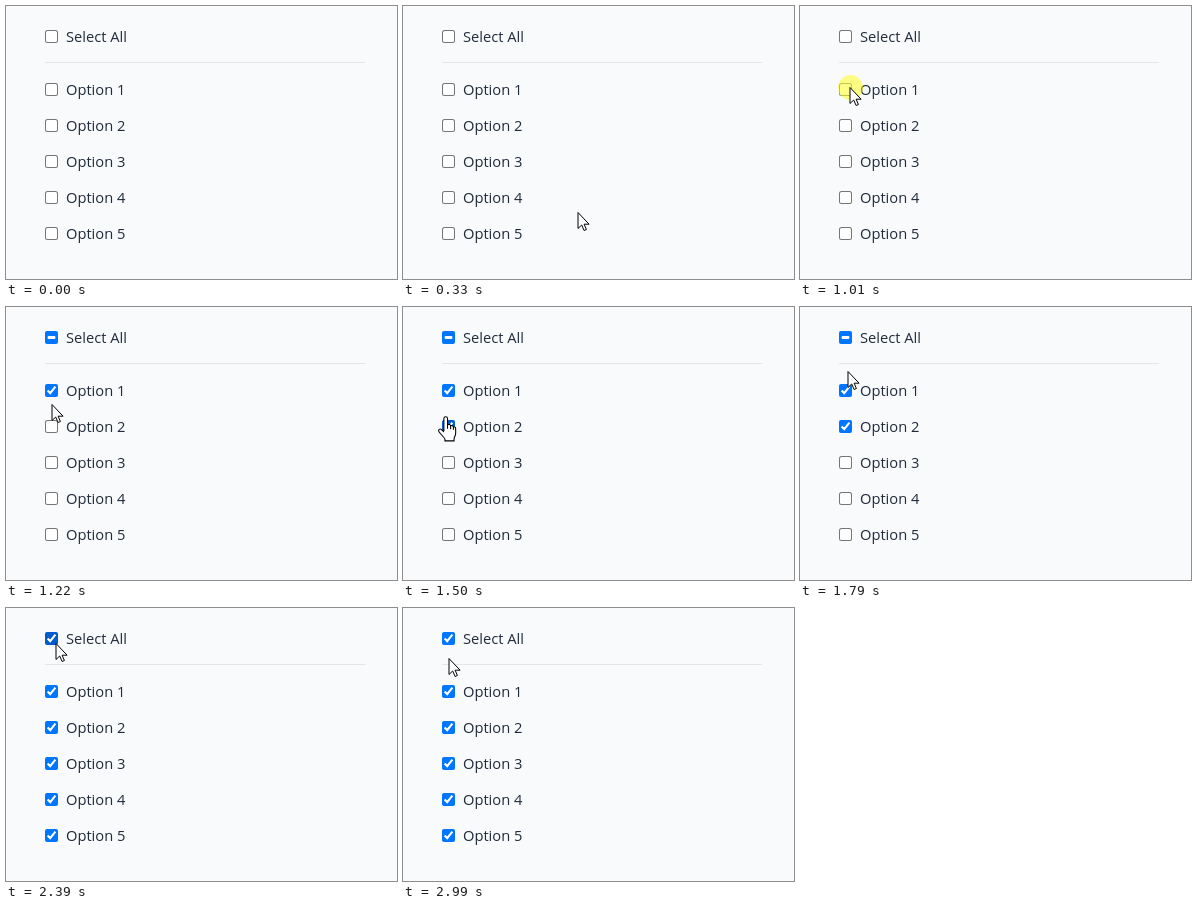
Animation, 391 px wide and 273 px high, one loop 3050 ms. Source, as an HTML page with a canvas:

```html
<!DOCTYPE html>
<html lang="en">
<head>
<meta charset="utf-8">
<title>Select all</title>
<style>
  html, body { margin: 0; width: 100%; height: 100%; overflow: hidden; background: #f9fafc; }
  canvas { display: block; }
</style>
</head>
<body>
<canvas id="stage" width="391" height="273"></canvas>
<script>
const ctx = document.getElementById('stage').getContext('2d');
const LOOP = 3050;
const STEP = 70;
const BOX = { x: 39, size: 13 };
const rows = [
  { label: 'Select All', y: 30.5 },
  ...[1, 2, 3, 4, 5].map(n => ({ label: 'Option ' + n, y: 47.5 + 36 * n }))
];

// The pointer enters from below right and glides to each place in turn.
const ENTRY = { x: 387, y: 304 };
const glides = [
  { start: 70, end: 130, x: 187, y: 220 },
  { start: 330, end: 600, x: 71, y: 82 },
  { start: 680, end: 820, x: 50, y: 81 },
  { start: 1150, end: 1360, x: 42, y: 113 },
  { start: 1500, end: 1990, x: 51, y: 41 },
  { start: 2040, end: 2110, x: 50, y: 35 },
  { start: 2920, end: 2990, x: 46, y: 50 }
];
const clicks = {
  first: { down: 960, up: 1080 },
  second: { down: 1360, up: 1500 },
  all: { down: 2250, up: 2390 }
};

const arrow = new Path2D('M.5.5V16.5L4.2 13L6.6 18.5L8.9 17.5L6.6 12.2H11.6Z');
const hand = new Path2D(
  'M5.5 14V2.3a1.7 1.7 0 0 1 3.4 0V8.2c1.2-.6 2.6-.2 2.9.9c1.2-.4 2.3 0 2.6 1' +
  'c1.2-.2 2.1.5 2.1 1.8V16.5c0 2-1.5 3.5-1.5 5V23.5H6.5V21.8' +
  'C5.5 19.5 2 17 .8 14.6C0 12.8 1.6 11.6 3 12.6L5.5 15');
const knuckles = new Path2D('M8.9 8.2V12M11.8 9.1V12.5M14.4 10.1V13');

const ease = p => p * p * (3 - 2 * p);
const mix = (a, b, p) => Math.round(a + (b - a) * p);

function progress({ start, end }, t) {
  const count = Math.round((end - start) / STEP);
  const done = Math.floor((t - start) / (end - start) * count + 1e-6) + 1;
  return ease(Math.min(1, done / (count + 1)));
}

function pointerAt(t) {
  const index = glides.findLastIndex(g => g.start <= t);
  if (index < 0) return null;
  const from = glides[index - 1] || ENTRY;
  const to = glides[index];
  const p = progress(to, t);
  return {
    x: mix(from.x, to.x, p),
    y: mix(from.y, to.y, p),
    pressed: Object.values(clicks).some(c => t >= c.down && t < c.up)
  };
}

function stateOf(index, t) {
  if (t >= clicks.all.up) return 'checked';
  if (index === 0) return t >= clicks.first.up ? 'mixed' : 'empty';
  const click = [clicks.first, clicks.second][index - 1];
  return click && t >= click.up ? 'checked' : 'empty';
}

function roundRect(x, y, w, h, r, color) {
  ctx.fillStyle = color;
  ctx.beginPath();
  ctx.roundRect(x, y, w, h, r);
  ctx.fill();
}

function drawBox(y, state, hover, pressed) {
  const { x, size } = BOX;
  if (state === 'empty') {
    const border = pressed ? '#8d8d8d' : hover ? '#4f4f4f' : '#767676';
    roundRect(x, y, size, size, 2.5, border);
    roundRect(x + 1, y + 1, size - 2, size - 2, 1.5, '#fff');
    return;
  }
  roundRect(x, y, size, size, 2, pressed ? '#3793ff' : hover ? '#005cc8' : '#0075ff');
  if (state === 'mixed') {
    roundRect(x + 2.6, y + 5, 7.8, 3, 1, '#fff');
    return;
  }
  ctx.strokeStyle = '#fff';
  ctx.lineWidth = 2.08;
  ctx.beginPath();
  ctx.moveTo(x + 2.6, y + 6.5);
  ctx.lineTo(x + 5.2, y + 9.1);
  ctx.lineTo(x + 10.4, y + 2.6);
  ctx.stroke();
}

function drawPointer({ x, y, pressed }, isHand) {
  if (pressed) {
    ctx.fillStyle = 'rgba(255,255,0,.48)';
    ctx.beginPath();
    ctx.arc(x + .5, y + .5, 12.5, 0, Math.PI * 2);
    ctx.fill();
  }
  ctx.save();
  if (isHand) {
    ctx.translate(x - 7, y - .8);
    ctx.scale(1.07, 1.05);
  } else {
    ctx.translate(x - .5, y);
  }
  ctx.fillStyle = '#fff';
  ctx.strokeStyle = '#000';
  ctx.lineWidth = 1;
  const shape = isHand ? hand : arrow;
  ctx.fill(shape);
  ctx.stroke(shape);
  if (isHand) ctx.stroke(knuckles);
  ctx.restore();
}

function draw(t) {
  ctx.fillStyle = '#f9fafc';
  ctx.fillRect(0, 0, 391, 273);
  ctx.fillStyle = '#e2e5e9';
  ctx.fillRect(39, 56, 320, 1);

  const pointer = pointerAt(t);
  const hovered = pointer && rows.find(r => Math.abs(pointer.y - r.y) <= 10);
  ctx.font = '14.7px "Open Sans", "Noto Sans", sans-serif';
  rows.forEach((row, i) => {
    const hover = row === hovered;
    drawBox(row.y - 6.5, stateOf(i, t), hover, hover && pointer.pressed);
    ctx.fillStyle = '#212b3b';
    ctx.fillText(row.label, 60, row.y + 5.5);
  });

  if (pointer) {
    const onBox = hovered && pointer.x < BOX.x + BOX.size && Math.abs(pointer.y - hovered.y) <= 6.5;
    drawPointer(pointer, hovered && !onBox);
  }
}

const start = performance.now();
function tick() {
  draw((performance.now() - start) % LOOP);
  requestAnimationFrame(tick);
}
tick();
</script>
</body>
</html>
```
